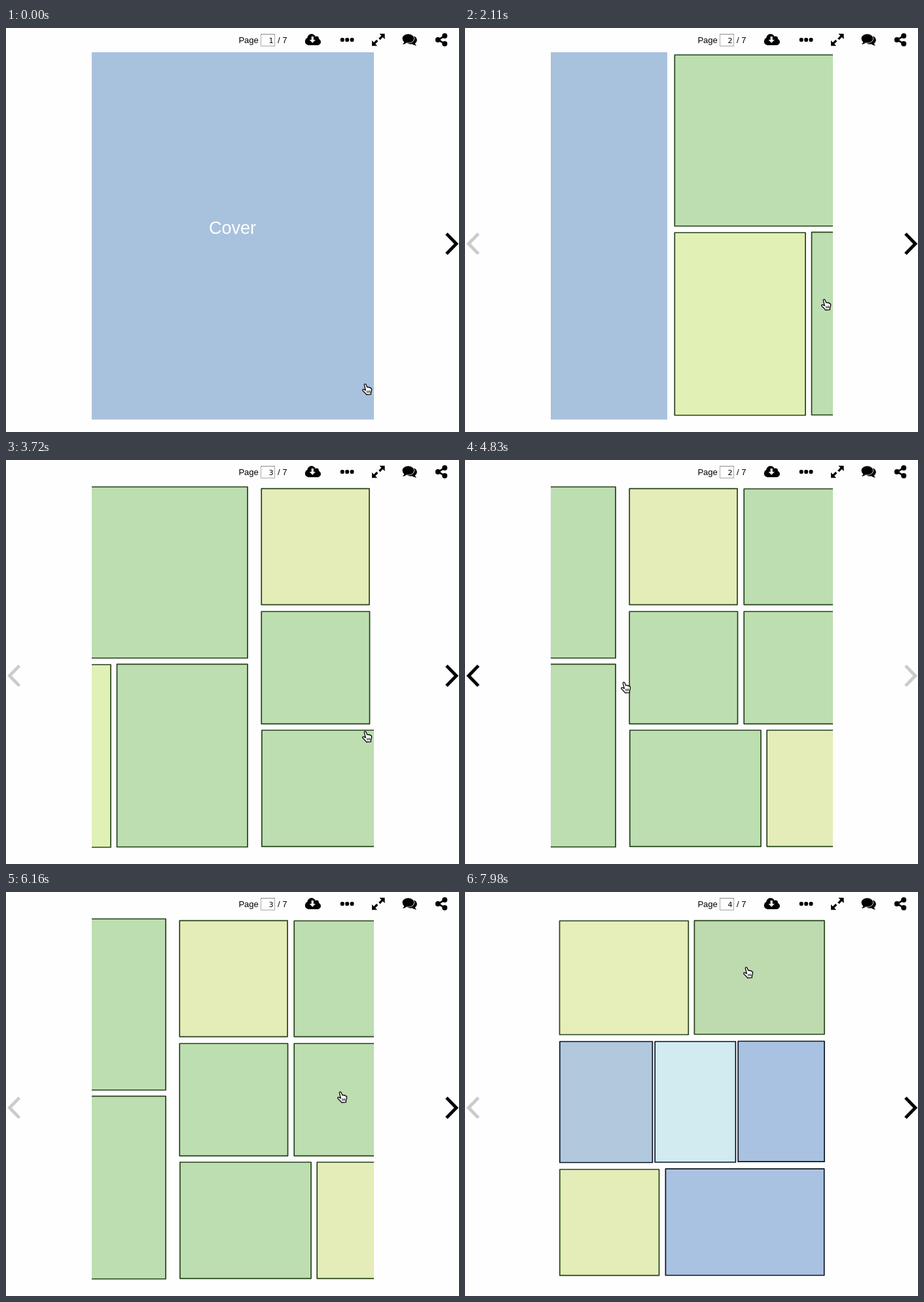
Recreate the animation shown at these times as an HTML page. Size 692 px wide and 616 px high, loop 8 s.

```html
<!DOCTYPE html>
<html lang="en">
<head>
<meta charset="utf-8">
<title>Page viewer</title>
<style>
  html, body { margin: 0; width: 100%; height: 100%; overflow: hidden; background: #fefefe; }
  svg { display: block; }
  text { font-family: "Liberation Sans", Arial, sans-serif; font-size: 13px; }
  #number { font-family: "DejaVu Sans", "Open Sans", sans-serif; font-size: 11px; }
  #cover { font-size: 27px; fill: #fff; text-anchor: middle; }
  .chevron { fill: none; stroke: #000; stroke-width: 4.9; }
</style>
</head>
<body>
<svg width="692" height="616" viewBox="0 0 692 616">
  <clipPath id="view"><rect x="131" y="37" width="431" height="560"/></clipPath>

  <g clip-path="url(#view)">
    <g id="strip">
      <rect y="37" width="431" height="560" fill="#a8c2de"/>
      <text id="cover" x="215" y="314">Cover</text>
    </g>
  </g>

  <g id="toolbar">
    <text x="355.4" y="23">Page</text>
    <rect x="389.5" y="9.5" width="21" height="18" fill="#fff" stroke="#a9a9a9"/>
    <path d="M389 9.5H411" stroke="#8a8a8a"/>
    <text id="number" x="405" y="23" text-anchor="middle">1</text>
    <text x="415" y="23">/ 7</text>

    <g id="download">
      <circle cx="462.6" cy="20.4" r="5.8"/>
      <circle cx="466.7" cy="15.6" r="6.5"/>
      <circle cx="474.4" cy="16" r="3.5"/>
      <circle cx="475.9" cy="21.2" r="5"/>
      <path d="M462 16H476V26.2H462Z"/>
      <path d="M466.6 13H469.8V18H472.8L468.2 22.8L463.6 18H466.6Z" fill="#fefefe"/>
    </g>

    <g id="more">
      <rect x="510.8" y="15" width="5.9" height="5.9" rx="2.2"/>
      <rect x="518.2" y="15" width="5.9" height="5.9" rx="2.2"/>
      <rect x="525.6" y="15" width="5.9" height="5.9" rx="2.2"/>
    </g>

    <g id="expand">
      <path d="M570.4 8.8H578.6V17ZM559 19V27.2H567.2Z"/>
      <path d="M576 11.4L570.4 17M561.6 24.6L567.2 19" stroke="#000" stroke-width="3.2"/>
    </g>

    <g id="comments">
      <path d="M620 12C625 12 627.8 15 627.8 18.3C627.8 20.6 626.6 22.4 624.8 23.4C625.2 25 626.4 25.8 627.4 26.8C624.6 27 622.4 26 621 24.6C616.5 25.2 613 23.8 611 22Z"/>
      <path d="M614.4 9.2C619.4 9.2 623.2 12.2 623.2 15.9S619.4 22.6 614.4 22.6L611.8 22.4C610.2 23.8 608.4 24.9 605.8 25C607 24 607.8 22.8 608.2 21.2C606.6 20 605.6 18 605.6 15.9C605.6 12.2 609.4 9.2 614.4 9.2Z" stroke="#fefefe" stroke-width="1.6" paint-order="stroke"/>
    </g>

    <g id="share">
      <path d="M670 12.1L660 18L670 23.9" fill="none" stroke="#000" stroke-width="2.7"/>
      <circle cx="659.8" cy="18" r="4"/>
      <circle cx="670.2" cy="12" r="4"/>
      <circle cx="670.2" cy="24" r="4"/>
    </g>
  </g>

  <path id="prev" class="chevron" d="M20.5 313.6L5.5 329L20.5 344.4"/>
  <path id="next" class="chevron" d="M672.9 313.6L687.9 329L672.9 344.4"/>

  <g id="hand" stroke-linejoin="round" stroke-linecap="round">
    <path d="M4.3 2.4C4.1.7 6.4.3 7 1.8L8.8 6C9.4 5 10.8 5.2 11.2 6.3C12 5.6 13.2 5.9 13.5 7C14.8 6.7 15.7 7.8 15.6 9.2C15.5 11.2 14.8 12.6 14.4 13.8V16.6L7.6 17C6.2 14.6 3.7 13 1.9 10.8C1 9.4 2.6 8.4 3.8 9.1L6.3 10.4Z" fill="#fff" stroke="#000" stroke-width="1.3"/>
    <path d="M8.6 11.4L9 14.2M10.6 11.2L11 14M12.6 11L12.8 13.8" stroke="#000" stroke-width=".9"/>
  </g>
</svg>

<script>
const LOOP = 8000, PAGE_W = 431, LEFT = 131, SLIDE = 400, DIM = 0.2;
const GREEN = '#bcdeb1', LIME = '#e1f0b5', YELLOW = '#e4edb7', BLUE = '#aac2e1';
const LEAF_INK = '#244218', NAVY_INK = '#081424';

// Each panel: x1, x2, y1, y2, fill, ink (leaf green by default)
const pages = [
  [],
  [
    [11.3, 420, 41, 302, GREEN],
    [11.3, 211, 312, 590.5, LIME], [220.5, 420, 311.3, 590, GREEN],
  ],
  [
    [10.2, 175, 43.6, 220.6, YELLOW], [185.2, 421, 44, 220.6, GREEN],
    [10.2, 175.5, 231, 402.3, GREEN], [185.2, 421, 231, 402.3, GREEN],
    [10.8, 211, 412, 589.3, GREEN], [220.2, 422, 412, 589.3, YELLOW],
  ],
  [
    [13.5, 210.3, 44, 217.5, '#e6eeb9'], [219.4, 418, 43.7, 217, '#bddbae'],
    [13.8, 155.4, 228, 412.5, '#b1c8dd', NAVY_INK],
    [159.2, 282.4, 228, 412, '#d1ebf0', NAVY_INK],
    [286.2, 418, 227.5, 411.2, BLUE, NAVY_INK],
    [13.8, 165.5, 423, 584.6, YELLOW], [175.4, 417.7, 422.2, 584.5, BLUE, NAVY_INK],
  ],
];

// Start of the slide, direction, and when the page number changes
const slides = [
  [1889, 1, 1850],
  [3541, 1, 3510],
  [4696, -1, 4700],
  [5905, 1, 5870],
  [7242, 1, 7250],
];

// Cursor: start, end, target x, target y
const moves = [
  [385, 990, 551, 421],
  [3950, 4430, 245, 346],
  [5110, 5540, 513, 312],
  [7640, 7980, 432, 122],
];
const HOME = [551, 550];
const HOVER_LEFT = 4240, HOVER_RIGHT = 5370, FADE = 200;

const $ = id => document.getElementById(id);
const ramp = (t, from, length) => Math.min(1, Math.max(0, (t - from) / length));
const swing = p => 0.5 - Math.cos(p * Math.PI) / 2;

function drawPanel(page, [x1, x2, y1, y2, fill, ink = LEAF_INK]) {
  const rect = document.createElementNS('http://www.w3.org/2000/svg', 'rect');
  const attrs = {
    x: page * PAGE_W + x1, y: y1, width: x2 - x1, height: y2 - y1,
    fill, stroke: ink, 'stroke-width': 1.7, 'stroke-linejoin': 'round',
  };
  for (const key in attrs) rect.setAttribute(key, attrs[key]);
  $('strip').append(rect);
}

pages.forEach((panels, page) => panels.forEach(panel => drawPanel(page, panel)));

function cursorAt(t) {
  let [x, y] = HOME;
  for (const [start, end, toX, toY] of moves) {
    const p = swing(ramp(t, start, end - start));
    x += (toX - x) * p;
    y += (toY - y) * p;
  }
  return [x, y];
}

function render(t) {
  let scroll = 0, page = 1;
  for (const [start, step, turn] of slides) {
    scroll += step * swing(ramp(t, start, SLIDE));
    if (t >= turn) page += step;
  }
  $('strip').setAttribute('transform', `translate(${LEFT - Math.round(scroll * PAGE_W)} 0)`);
  if ($('number').textContent !== String(page)) $('number').textContent = page;

  const hover = ramp(t, HOVER_LEFT, FADE) - ramp(t, HOVER_RIGHT, FADE);
  $('prev').style.opacity = t < slides[0][2] ? 0 : DIM + (1 - DIM) * hover;
  $('next').style.opacity = 1 - (1 - DIM) * hover;

  const [x, y] = cursorAt(t);
  $('hand').setAttribute('transform', `translate(${Math.round(x) - 8} ${Math.round(y) - 8})`);
}

function tick() {
  render(performance.now() % LOOP);
  requestAnimationFrame(tick);
}
tick();
</script>
</body>
</html>
```
